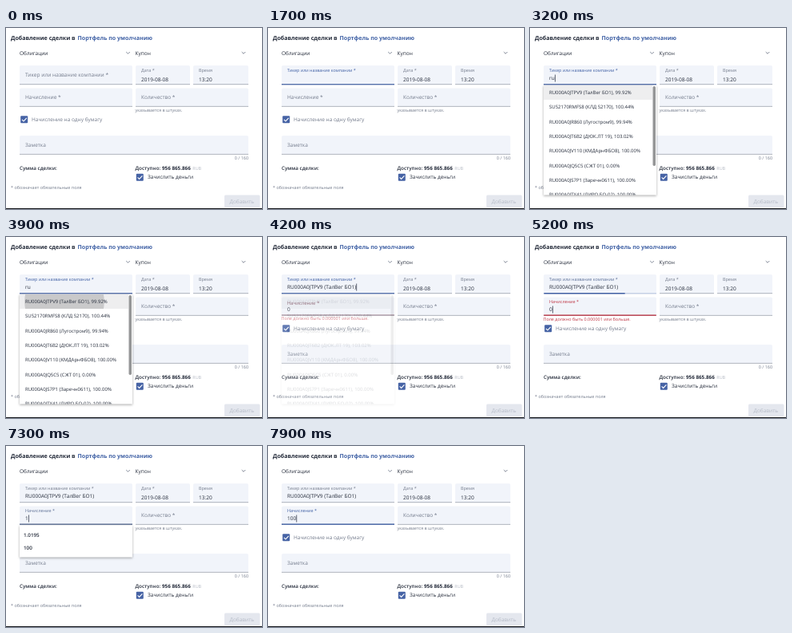
An HTML page for the animation above (8000 ms loop, 320x227 px).

```html
<!DOCTYPE html>
<html lang="ru">
<head>
<meta charset="utf-8">
<title>Добавление сделки</title>
<style>
  html, body { margin: 0; width: 100%; height: 100%; overflow: hidden; background: #fff; }
  svg { display: block; width: 100vw; height: 100vh; }
  text { font: 6.5px "Open Sans", "Noto Sans", sans-serif; fill: #252c3b; white-space: pre; text-rendering: geometricPrecision; }
  .label { fill: #737b8c; }
  .small { font-size: 5.45px; }
  .title { font-size: 7.1px; font-weight: 700; }
  .link { fill: #4263a6; }
  .strong { font-size: 6.3px; font-weight: 600; }
  .bold { font-size: 6.3px; font-weight: 700; }
  .option { font-size: 6px; }
  .box { fill: #f1f4fa; }
  .line { fill: #9298a5; }
  .chevron { fill: none; stroke: #737b8c; stroke-width: .9; }
  .shadow { filter: drop-shadow(0 1px 1.5px rgba(0, 0, 0, .35)); }
</style>
</head>
<body>
<svg id="stage" viewBox="0 0 320 227" preserveAspectRatio="none">
  <defs>
    <clipPath id="listClip"><rect x="17" y="72" width="141" height="137.5"/></clipPath>
    <clipPath id="rowClip"><rect x="17" y="72" width="136" height="18"/></clipPath>
  </defs>
  <g id="form"></g>
  <g id="list">
    <rect class="shadow" x="17" y="72" width="141" height="137.5" fill="#fff"/>
    <g clip-path="url(#listClip)">
      <rect id="hover" x="17" y="72" width="136" height="18" fill="#eeeeef"/>
      <circle id="ripple" cx="73" cy="81" clip-path="url(#rowClip)" fill="#c9c9ca"/>
      <g id="options"></g>
      <rect x="153.5" y="73" width="3.5" height="100" rx="1.7" fill="#959697"/>
    </g>
  </g>
  <g id="hints">
    <rect class="shadow" x="17" y="99.5" width="141" height="40" fill="#fff"/>
    <rect id="hintHover" x="17" y="120" width="141" height="16" fill="#e8e8e9"/>
  </g>
</svg>
<script>
const LOOP = 8000;
const BLUE = [62, 94, 163], GRAY = [115, 123, 140], RED = [190, 50, 65];
const $ = id => document.getElementById(id);
const form = $('form');

function add(parent, tag, attrs, content = '') {
  const el = document.createElementNS('http://www.w3.org/2000/svg', tag);
  set(el, attrs);
  el.textContent = content;
  return parent.appendChild(el);
}
function set(el, attrs) {
  for (const name in attrs) el.setAttribute(name, attrs[name]);
}
const write = (x, y, content, cls = '', parent = form) =>
  add(parent, 'text', { x, y, class: cls }, content);
const rect = (x, y, width, height, attrs) =>
  add(form, 'rect', { x, y, width, height, ...attrs });

const clamp = u => Math.max(0, Math.min(1, u));
const progress = (t, start, duration) => clamp((t - start) / duration);
const ease = u => 1 - (1 - u) ** 3;
const mix = (a, b, u) => a + (b - a) * u;
const blend = (a, b, u) => `rgb(${a.map((v, i) => mix(v, b[i], u))})`;
const show = (el, visible) => set(el, { visibility: visible ? 'visible' : 'hidden' });

function field(x, y, width, height) {
  add(form, 'path', {
    class: 'box',
    d: `M${x} ${y + height}v${2 - height}q0-2 2-2h${width - 4}q2 0 2 2v${height - 2}z`
  });
  rect(x, y + height - .6, width, .7, { class: 'line' });
}
function chevron(x) {
  add(form, 'path', { class: 'chevron', d: `M${x - 2.3} 30l2.3 2.3 2.3-2.3` });
}
function checkbox(x, y) {
  rect(x, y, 9, 9, { rx: 1, fill: '#4663a5' });
  add(form, 'path', { d: `M${x + 1.8} ${y + 4.6}l2 2 3.8-4`, fill: 'none', stroke: '#fff', 'stroke-width': 1.1 });
}

// An input whose label floats and whose underline grows from the middle.
function input(y, restY) {
  return {
    y, restY,
    underline: rect(17, 0, 141, 1, {}),
    selection: rect(24, y + 10.8, 3.9, 9.4, { fill: '#3390ff' }),
    label: write(24, restY, '', 'label'),
    value: write(24, y + 18.3, ''),
    caret: rect(0, y + 11.5, .7, 9, { fill: '#20283a' })
  };
}
function drawInput(f, { label, value, float, color, focus, lineColor, caret, selected }) {
  f.label.textContent = label;
  f.label.style.fontSize = mix(6.6, 5.45, float) + 'px';
  f.label.style.fill = color;
  set(f.label, { y: mix(f.restY, f.y + 8, float) });
  if (f.value.textContent !== value) f.value.textContent = value;
  f.value.style.fill = selected ? '#fff' : '';
  set(f.underline, { x: 87.5 - 70.5 * focus, width: 141 * focus, fill: lineColor });
  set(f.caret, { x: 24.3 + (value ? f.value.getComputedTextLength() : 0) });
  show(f.caret, caret);
  show(f.selection, selected);
}

// Static form
write(6, 15, 'Добавление сделки в', 'title');
write(89.5, 15.3, 'Портфель по умолчанию', 'title link');
write(17, 33.5, 'Облигации');
write(161.5, 33.5, 'Купон');
chevron(152.5);
chevron(297);
field(17, 47, 141, 24);
field(162, 47, 68, 24);
field(234, 47, 69, 24);
field(17, 75.5, 141, 23);
field(162, 75.5, 141, 23);
field(17, 135, 286, 23.5);
write(169, 55.3, 'Дата *', 'label small');
write(169, 66.5, '2019-08-08');
write(241, 55.3, 'Время', 'label small');
write(241, 66.5, '13:20');
write(169, 88.8, 'Количество *', 'label');
write(161.5, 104.5, 'указывается в штуках.', 'label small');
checkbox(18.2, 110.3);
write(32, 117.2, 'Начисление на одну бумагу', 'label');
write(24, 149.2, 'Заметка', 'label');
set(write(303, 165, '0 / 160', 'label small'), { 'text-anchor': 'end' });
write(17, 178, 'Сумма сделки:', 'strong');
write(161.5, 178, 'Доступно:', 'strong');
write(195, 178, '956 865.866', 'bold');
write(233.3, 178, 'RUB', 'small').style.fill = '#b4b9c3';
checkbox(162.8, 182.8);
write(177, 189.3, 'Зачислить деньги');
write(6, 202.3, '* обозначает обязательные поля', 'label small');
rect(273, 209.5, 44.5, 15.5, { rx: 1.5, fill: '#e4e7ee' });
write(279.5, 219.6, 'Добавить').style.fill = '#b5bbc7';
rect(0, 226, 320, 1, { fill: '#16181d' });

const ticker = input(47, 61);
const accrual = input(75, 88.8);
const error = write(16.5, 104.5, 'Поле должно быть 0.000001 или больше.', 'small');
error.style.fill = blend(RED, RED, 0);
const track = rect(17, 70, 141, 1.4, { fill: '#c5d0e6' });
const bar = rect(17, 70, 0, 1.4, { fill: '#3e5ea3' });

const bonds = [
  'RU000A0JTPV9 (ТалВег БО1), 99.92%',
  'SU52170RMFS8 (КЛД 52170), 100.44%',
  'RU000A0JR860 (Лугостром9), 99.94%',
  'RU000A0JT6B2 (ДЮК.ЛТ 19), 103.02%',
  'RU000A0JV110 (КМДАрнФБО8), 100.00%',
  'RU000A0JQ5C5 (СЖТ 01), 0.00%',
  'RU000A0JS7P1 (Заречн0611), 100.00%',
  'RU000A0JTX41 (ЛИРО БО-02), 100.00%'
];
bonds.forEach((bond, i) => write(24, 82.8 + i * 18.35, bond, 'option', $('options')));
const chosen = bonds[0].split(',')[0];
write(22, 113.8, '1.0195', 'strong', $('hints'));
write(22, 130.3, '100', 'strong', $('hints'));

// One sweep of the loading bar: the head runs ahead, the tail catches up.
function drawLoading(t) {
  const start = t < 4000 ? 2300 : 5000;
  const d = t - start;
  const loading = d >= 0 && d < 500;
  show(track, loading);
  show(bar, loading);
  if (!loading) return;
  const head = d < 200 ? .72 * d / 200 : d < 400 ? mix(.72, .94, (d - 200) / 200) : mix(.94, 1, (d - 400) / 100);
  const tail = progress(d, 200, 300);
  set(bar, { x: 17 + 141 * tail, width: 141 * Math.max(0, head - tail) });
}

const blink = (t, start) => t >= start && (t - start) % 1000 < 500;

function draw(t) {
  const picked = t >= 4100;
  const tickerFocus = ease(progress(t, 50, 350));
  const blur = progress(t, 5000, 400);
  drawInput(ticker, {
    label: 'Тикер или название компании *',
    value: t < 2000 ? '' : t < 2100 ? 'r' : picked ? chosen : 'ru',
    float: tickerFocus,
    color: blend(GRAY, BLUE, tickerFocus * (1 - blur)),
    focus: t < 5000 ? tickerFocus : 0,
    lineColor: blend(BLUE, BLUE, 0),
    caret: t < 5000 && (t < 2000 ? blink(t, 200) : blink(t, 2100) || t < 2100),
    selected: false
  });
  set(ticker.underline, { y: 70.2, height: 1.1 });

  const invalid = picked && t < 7300;
  const focused = t >= 5000;
  const recover = mix(.4, 1, progress(t, 7300, 100));
  const accrualColor = invalid ? blend(GRAY, RED, progress(t, 4100, 300))
    : blend(GRAY, BLUE, t < 7300 ? 0 : recover);
  drawInput(accrual, {
    label: 'Начисление *',
    value: !picked ? '' : t < 7300 ? '0' : t < 7700 ? '1' : '100',
    float: ease(progress(t, 4100, 400)),
    color: accrualColor,
    focus: !picked ? 0 : focused && t < 7300 ? mix(.5, 1, ease(progress(t, 5000, 250))) : 1,
    lineColor: accrualColor,
    caret: focused && t < 5500 || t >= 7300,
    selected: t >= 5900 && t < 7300
  });
  set(accrual.underline, { y: 97.5, height: focused ? 1.3 : .8 });

  const slide = ease(progress(t, 4100, 300));
  show(error, invalid);
  set(error, { opacity: slide, y: 102.5 + 2 * slide });
  drawLoading(t);

  const open = ease(progress(t, 2850, 200));
  show($('list'), t >= 2850 && t < 4220);
  set($('list'), {
    opacity: open * (1 - progress(t, 4100, 120)),
    transform: `translate(0 72) scale(1 ${mix(.8, 1, open)}) translate(0 -72)`
  });
  const ripple = progress(t, 3820, 140);
  set($('ripple'), { r: 86 * ripple });

  show($('hints'), t >= 7300 && t < 7800);
  set($('hintHover'), { opacity: t >= 7700 ? 1 : 0 });
}

function tick() {
  draw(performance.now() % LOOP);
  requestAnimationFrame(tick);
}
tick();
</script>
</body>
</html>
```
